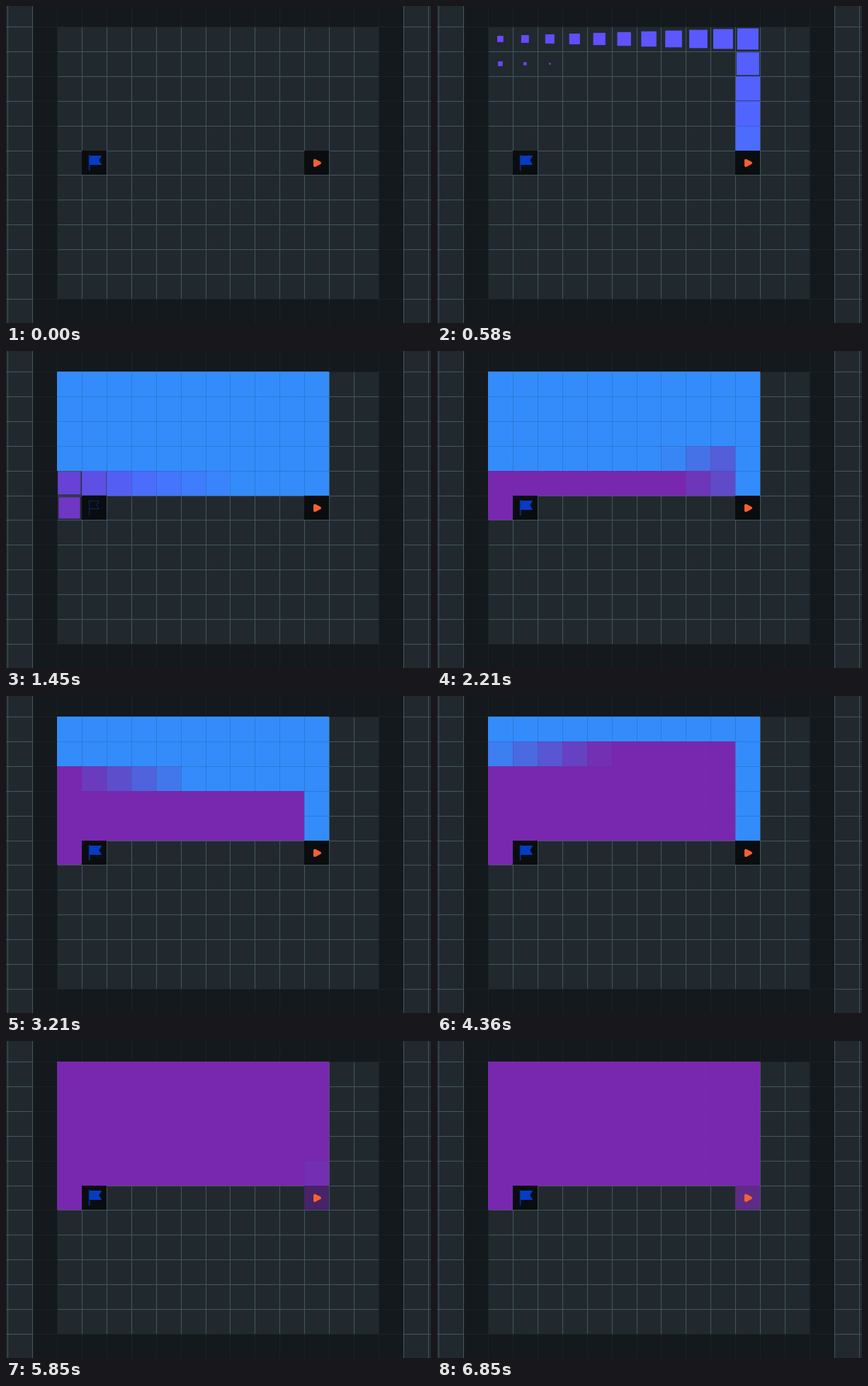
An HTML page with a canvas that plays this animation: 600 by 447 pixels, repeating every 6880 ms.

```html
<!DOCTYPE html>
<html lang="en">
<head>
<meta charset="utf-8">
<title>Depth-first search</title>
<style>
html, body { margin: 0; width: 100%; height: 100%; overflow: hidden; background: #21292f; }
canvas { display: block; }
</style>
</head>
<body>
<canvas id="stage" width="600" height="447"></canvas>
<script>
const ctx = document.getElementById('stage').getContext('2d');
const LOOP = 6880, PITCH = 34.95;
const VISIT = { start: 272, step: 17, grow: 280, length: 380 };
const PATH = { start: 1165, step: 78.5, length: 395 };
const VIOLET = [112, 64, 255], INDIGO = [82, 98, 253], BLUE = [52, 140, 251], PURPLE = [120, 40, 174];
const START = [10, 5], GOAL = [1, 5];

const lineX = c => Math.floor(72.3 + PITCH * c);
const lineY = r => Math.floor(29.25 + PITCH * r);
const clamp = v => Math.max(0, Math.min(1, v));
const mix = (a, b, p) => a.map((v, i) => v + (b[i] - v) * p);
const css = rgb => `rgb(${rgb.map(Math.round).join()})`;

function rect(color, x, y, w, h) {
  ctx.fillStyle = color;
  ctx.fillRect(x, y, w, h);
}

// Search order: up from the start, along the top, then row by row to the goal.
const cells = [];
for (let r = 4; r >= 0; r--) cells.push([10, r]);
for (let r = 0; r < 5; r++)
  for (let i = 0; i < 10; i++) cells.push([r % 2 ? i : 9 - i, r]);
cells.push([0, 5]);

function drawGrid() {
  rect('#21292f', 0, 0, 600, 447);
  for (let c = -2; c <= 15; c++) rect('#43575d', lineX(c), 0, 1, 447);
  for (let r = 0; r <= 11; r++) rect('#43575d', 0, lineY(r), 600, 1);

  // The walls let the grid lines shine through faintly.
  const outer = lineX(-1) + 1, left = lineX(0) + 1, right = lineX(13);
  const top = lineY(0) + 1, bottom = lineY(11);
  const wall = 'rgba(18,22,26,.82)';
  rect(wall, outer, 0, left - outer, 447);
  rect(wall, right, 0, lineX(14) - right, 447);
  rect(wall, left, 0, right - left, top);
  rect(wall, left, bottom, right - left, 447 - bottom);
}

function fillCell([c, r], color) {
  rect(color, lineX(c), lineY(r), lineX(c + 1) - lineX(c), lineY(r + 1) - lineY(r));
}

function pathProgress(index, t) {
  return clamp((t - PATH.start - PATH.step * index) / PATH.length);
}

function drawCell([c, r], index, t) {
  const age = t - VISIT.start - VISIT.step * index;
  if (age <= 0) return;
  const turned = pathProgress(cells.length - 1 - index, t);
  const p = clamp(age / VISIT.length);
  const visited = p < .75 ? mix(VIOLET, INDIGO, p / .75) : mix(INDIGO, BLUE, (p - .75) * 4);
  const color = css(mix(visited, PURPLE, turned));
  if (age < VISIT.grow) {
    const size = 35 * age / VISIT.grow;
    const x = 71.9 + PITCH * (c + .5), y = 29 + PITCH * (r + .5);
    rect(color, x - size / 2, y - size / 2, size, size);
    return;
  }
  fillCell([c, r], color);
  const edge = `rgba(20,70,110,${.25 - .18 * turned})`;
  const x = lineX(c), y = lineY(r);
  if (r > 0) rect(edge, x, y, lineX(c + 1) - x, 1);
  if (c > 0) rect(edge, x, y, 1, lineY(r + 1) - y);
}

function drawFlag(outlined) {
  fillCell(GOAL, '#0a0d0f');
  if (outlined) {
    ctx.strokeStyle = '#0a2468';
    ctx.lineWidth = 1.2;
    ctx.stroke(new Path2D('M117.5 210V232M117.5 211.5H131L128 217L131 222.5H117.5'));
  } else {
    rect('#0a2f9c', 116.8, 210, 1.6, 22);
    ctx.fillStyle = '#063bc4';
    ctx.fill(new Path2D('M118 211H135.3L131.3 217.5L135.3 224H118Z'));
  }
}

function drawStart(turned) {
  fillCell(START, css(mix([10, 13, 15], [94, 43, 135], turned)));
  const arrow = new Path2D('M436 217.7L443 221.3L436 224.9Z');
  ctx.fillStyle = ctx.strokeStyle = '#f9602f';
  ctx.lineWidth = 4;
  ctx.lineJoin = 'round';
  ctx.fill(arrow);
  ctx.stroke(arrow);
  ctx.lineJoin = 'miter';
}

let origin;
function draw(now) {
  origin ??= now;
  const t = (now - origin) % LOOP;
  drawGrid();
  cells.forEach((cell, i) => drawCell(cell, i, t));
  drawFlag(t > 1235 && t < 1640);
  drawStart(pathProgress(cells.length, t));
  requestAnimationFrame(draw);
}
requestAnimationFrame(draw);
</script>
</body>
</html>
```
